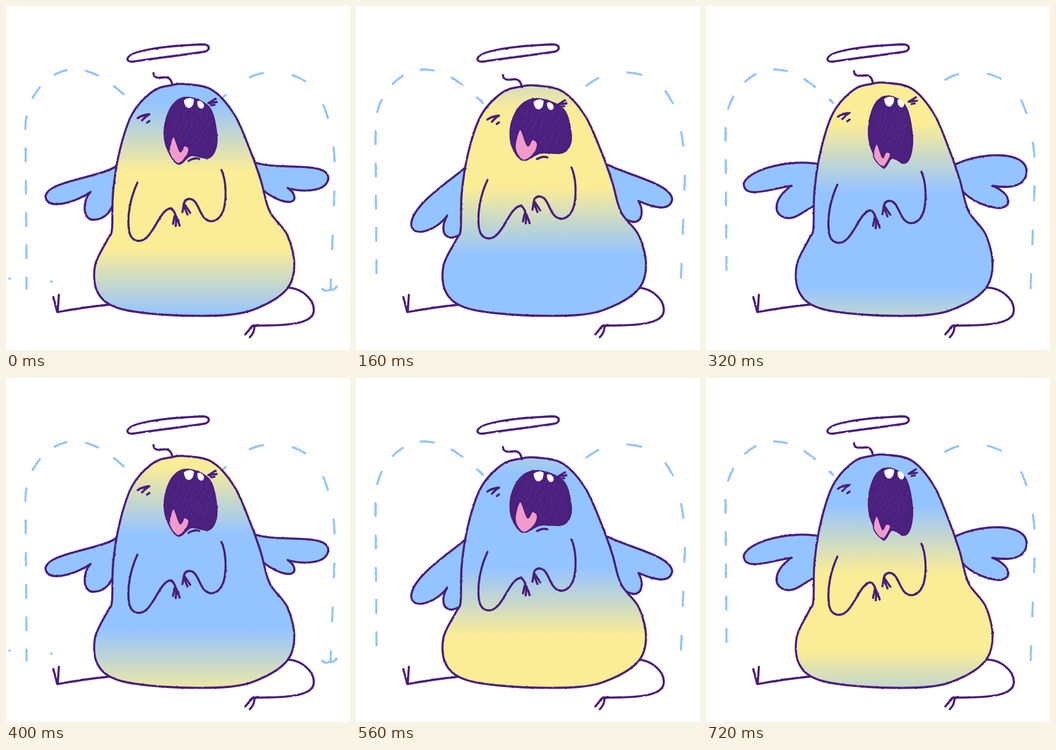
Animation of 618 by 618 pixels, one loop 800 ms. Source, as an HTML page:

```html
<!DOCTYPE html>
<html lang="en">
<head>
<meta charset="utf-8">
<title>Singing angel blob</title>
<style>
  html, body { margin: 0; width: 100%; height: 100%; overflow: hidden; background: #fff; }
  svg { display: block; width: 618px; height: 618px; }
  path { fill: none; stroke: #4a1d7c; stroke-width: 3.8; stroke-linecap: round; stroke-linejoin: round; }
  .wing { fill: #94c4ff; }
  .body { fill: url(#skin); }
  .trail { stroke: #92c3fc; }
  .mouth { fill: #4c207f; stroke-width: 3; }
  .grain { stroke: #7d5aa9; stroke-width: 1; opacity: .35; }
  .tongue { fill: #f19bcb; stroke-width: 2; }
  .tooth { fill: #fff; stroke: none; }
</style>
</head>
<body>
<svg viewBox="0 0 618 618">
  <defs>
    <linearGradient id="skin" gradientUnits="userSpaceOnUse" spreadMethod="repeat" x1="0" y1="0" x2="0" y2="550">
      <stop offset=".14" stop-color="#94c4ff"/>
      <stop offset=".36" stop-color="#fbed95"/>
      <stop offset=".61" stop-color="#fbed95"/>
      <stop offset=".83" stop-color="#94c4ff"/>
    </linearGradient>
    <filter id="rough" filterUnits="userSpaceOnUse" x="0" y="0" width="618" height="618" color-interpolation-filters="sRGB">
      <feTurbulence type="fractalNoise" baseFrequency=".2" numOctaves="2" seed="4" result="noise"/>
      <feDisplacementMap in="SourceGraphic" in2="noise" scale="2.2" xChannelSelector="R" yChannelSelector="G"/>
    </filter>
  </defs>
  <g id="scene" filter="url(#rough)"></g>
</svg>
<script>
const FRAME_MS = 80, STEPS = 10;
const SKIN_PERIOD = 550;  // height of one blue and yellow wave
const scene = document.getElementById('scene');
const skin = document.getElementById('skin');

const numbers = s => s.match(/-?[\d.]+/g).map(Number);

// Blends two strings that share the same structure.
function blend(a, b, k) {
  const to = numbers(b);
  let i = 0;
  return a.replace(/-?[\d.]+/g, n => +n + (to[i++] - n) * k);
}

// Closed Catmull-Rom curve through "x,y x,y ..." points.
function closedCurve(text) {
  const v = numbers(text), n = v.length / 2;
  const at = i => { const j = (i + n) % n * 2; return [v[j], v[j + 1]]; };
  let d = `M${at(0)}`;
  for (let i = 0; i < n; i++) {
    const [p, a, b, q] = [-1, 0, 1, 2].map(o => at(i + o));
    d += `C${a.map((c, j) => c + (b[j] - p[j]) / 6)} ${b.map((c, j) => c - (q[j] - a[j]) / 6)} ${b}`;
  }
  return d + 'Z';
}

const body = closedCurve('325,143 372,154 412,198 440,260 460,315 476,370 508,412 521,465 508,508 460,540 400,555 290,555 200,543 162,515 157,467 180,420 188,402 190,335 202,262 225,196 262,156 295,145');
const lips = {
  wide: '328,167 297,178 279,212 280,250 300,277 331,264 368,264 383,252 386,228 372,185',
  tall: '328,162 305,175 293,212 296,252 318,290 334,273 357,282 368,265 370,228 358,180'
};
const tongue = {
  wide: '295,222 286,255 300,277 319,266 326,248 317,240 308,251',
  tall: '307,248 301,270 317,289 328,276 331,265 323,263 317,272'
};
const halo = 'M219 93C224 82 270 72 355 69C367 70 367 79 357 82C325 87 260 95 228 100C218 100 217 96 219 93Z';
const legs = 'M190 536Q140 541 92 550L85 523M93 548L95 519M500 506C530 504 553 527 553 546C553 567 525 575 443 574L430 590M443 574l-3 5M446 576Q447 586 438 595';
const arms = 'M236 314C224 340 217 372 221 400C225 422 243 423 255 410C270 394 280 360 297 360Q304 366 306 378M303 374L300 388M306 376L305 392M306 375L312 391'
  + 'M387 291C395 308 397 340 391 362C386 377 377 384 367 383C346 380 348 343 329 343Q320 344 319 355L317 367M319 354L326 371M321 353L331 368';
const hair = 'M298 146C296 134 290 130 281 132C272 133 264 133 264 124';
const eyes = 'M236 204Q245 198 257 197Q250 201 244 208M253 212l4 -3M376 169L363 177L378 175M368 181l6 -1';
const teeth = 'M319 172Q320 185 328 186Q337 184 337 170Q328 165 319 172ZM343 174Q343 186 350 187Q356 186 355 179Q349 170 343 174Z';
const chin = 'M325 275Q335 269 344 272';

const trails = [
  { d: 'M37 508L35 215C35 165 75 114 122 114C160 114 190 138 228 174', dash: 23, period: 58 },
  { d: 'M583 510L590 330C594 270 585 215 572 183C556 140 525 119 478 119C445 119 420 135 390 164', dash: 25, period: 79 }
];

// Left and right wing through one beat.
const high = ['M202 284C160 275 80 290 68 318C65 350 125 326 154 323C120 345 118 378 147 381C165 382 180 364 197 358',
  'M449 284C495 262 574 260 576 296C576 325 545 328 514 323C545 334 555 362 525 363C495 360 464 342 457 326'];
const level = ['M200 286C175 308 75 313 71 342C73 370 130 350 152 334C136 352 138 384 157 384C178 384 190 368 194 350',
  'M447 281C490 296 576 278 579 308C578 336 530 334 506 327C522 338 522 352 508 352C493 352 470 339 460 329'];
const low = ['M198 286C175 325 92 342 89 374C90 405 150 385 168 355C152 378 152 402 173 403C181 402 186 399 190 397',
  'M453 287C478 315 569 318 571 348C567 376 525 362 502 352C509 366 504 378 491 379C484 379 476 377 470 372'];
const lowest = ['M196 292C165 308 108 365 106 403C108 432 150 408 161 391C153 408 157 425 171 425C178 424 182 421 186 419',
  'M450 283C490 295 565 320 566 347C561 371 527 356 511 349C524 372 519 393 506 394C497 393 489 388 483 382'];
const falling = low.map((d, i) => blend(d, lowest[i], .6));

// stretch: squat to tall; lift: arms raised; shift: start of the dashes on each trail.
const poses = [
  { wing: level, stretch: .5, lift: 0, shift: [55, 73], marks: 'M568 508Q574 514 580 510Q588 512 594 504M6 490h1M81 495h1' },
  { wing: low, stretch: 0, lift: 0, shift: [49, 44], marks: 'M556 499h1M604 501h1' },
  { wing: falling, stretch: 0, lift: 1, shift: [28, 22], marks: '' },
  { wing: lowest, stretch: 0, lift: 2, shift: [6, 0], marks: 'M11 498h1M68 498h1' },
  { wing: high, stretch: 1, lift: 0, shift: [34, 3], marks: '' }
];

const path = (d, cls = '', extra = '') => `<path class="${cls}" d="${d}" ${extra}/>`;
const move = (x, y) => `transform="translate(${x} ${y})"`;

function dashes({ d, dash, period }, shift) {
  return path(d, 'trail', `stroke-dasharray="${dash} ${period - dash}" stroke-dashoffset="${-shift}"`);
}

// Short chalk strokes on a sunflower spiral.
function grain(width) {
  let d = '';
  for (let i = 0; i < 40; i++) {
    const a = i * 2.4, r = Math.sqrt(i / 40);
    d += `M${332 + width * r * Math.cos(a)} ${220 + 40 * r * Math.sin(a)}l${4 + i % 4} ${-8 - i % 5}`;
  }
  return d;
}

function draw(step) {
  const { wing, stretch: k, lift, shift, marks } = poses[step % poses.length];
  const grow = `transform="translate(335 555) scale(${1 - .033 * k} ${1 + .012 * k}) translate(-335 -555)"`;
  const face = move(k, -5 * k);
  skin.setAttribute('gradientTransform', `translate(0 ${100 - step * SKIN_PERIOD / STEPS})`);
  scene.innerHTML = trails.map((t, i) => dashes(t, shift[i])).join('') + path(marks, 'trail')
    + path(halo) + path(legs)
    + path(wing[0] + 'L240 340Z', 'wing') + path(wing[1] + 'L420 330Z', 'wing')
    + path(body, 'body', grow) + path(hair, '', move(2 * k, -7 * k))
    + path(arms, '', move(0, 7 * k - lift)) + path(eyes, '', face)
    + path(closedCurve(blend(lips.wide, lips.tall, k)), 'mouth') + path(grain(40 - 12 * k), 'grain')
    + path(closedCurve(blend(tongue.wide, tongue.tall, k)), 'tongue') + path(teeth, 'tooth', face)
    + (k < 1 ? path(chin, '', move(6 * k, 6 * k)) : '');
}

let shown = -1;
function tick() {
  const step = Math.floor(performance.now() / FRAME_MS) % STEPS;
  if (step !== shown) draw(shown = step);
  requestAnimationFrame(tick);
}
tick();
</script>
</body>
</html>
```
